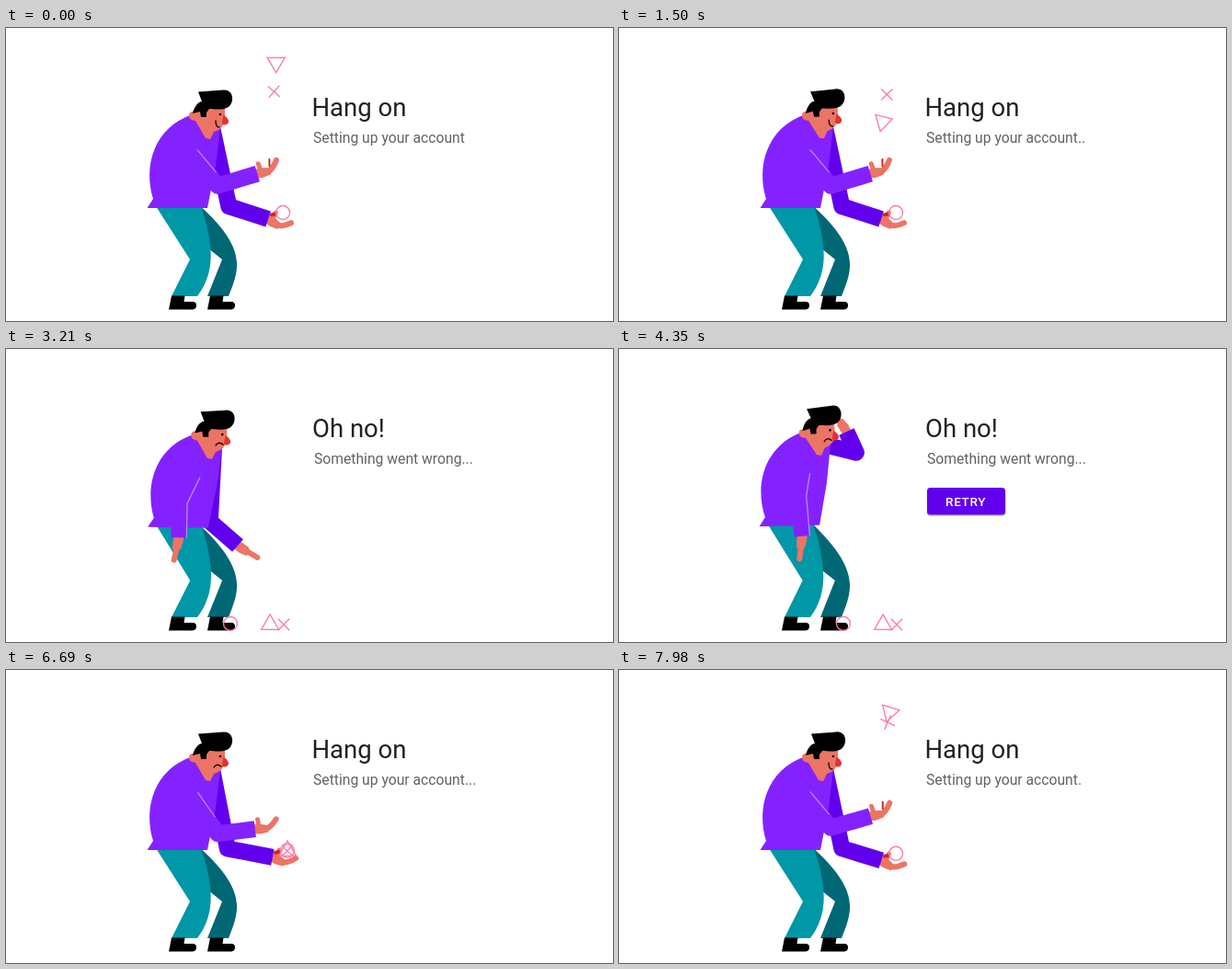
An HTML page for the animation above (8 s loop, 660 px wide and 319 px high).

```html
<!DOCTYPE html>
<html lang="en">
<head>
<meta charset="utf-8">
<title>Setting up</title>
<style>
  html, body { margin: 0; height: 100%; overflow: hidden; background: #fff; }
  svg { display: block; width: 660px; height: 319px; }
  text { font-family: Roboto, sans-serif; }
  .title { font-size: 27.5px; fill: #212121; }
  .sub { font-size: 15.7px; fill: #5f6368; }
  .label { font-size: 13.5px; font-weight: 500; letter-spacing: .7px; fill: #fff; }
  .skin { fill: #ec7465; }
  .line { fill: none; stroke-linecap: round; }
  .hand { stroke: #ec7465; }
  .sleeve { fill: none; stroke-width: 18; stroke-linejoin: round; }
  .toy { fill: none; stroke: #ff7bab; stroke-width: 1.4; }
</style>
</head>
<body>
<svg viewBox="0 0 660 319">
  <path id="backLeg" fill="#006874"/>
  <path id="frontLeg" fill="#0097a7"/>
  <path id="shoe" d="M180 291.500H194.500L193.500 298H203Q207 298 207 302T203 306.500H177Z"/>
  <use href="#shoe" x="42"/>
  <g id="backHand"></g>
  <path id="backArm" class="sleeve" stroke="#6200ee"/>
  <path id="torso" fill="#8422ff" d="M153.500 196 160 186C149 150 161 108 203 94L233 108 228 150 219 196Z"/>
  <g id="head">
    <path class="skin" d="M203 91 218 84 238 86V99Q237 110 226 113L222 121 217 120 206 101Q199 100 199 95.500T203 91Z"/>
    <path d="M236.500 94.500Q242.500 99 242 102T238 105.500 235 102Z" fill="#e5322d"/>
    <circle cx="233" cy="94" r="1.300"/>
    <path id="mouth" class="line" stroke="#111" stroke-width="1.400"/>
    <path d="M209 69.500 236 67.500C248 66 249 82 241 86.500 234 90 226 88 221 88L218 92V97H212L211 91 203 93C205 84 210 80 213 80Z"/>
  </g>
  <g id="frontHand"></g>
  <path id="frontArm" class="sleeve" stroke="#8422ff"/>
  <path id="crease" class="line" stroke="#b98cff" stroke-width="1.300" pathLength="1"/>
  <circle id="circle" class="toy" r="7.500"/>
  <path id="triangle" class="toy" d="M0-10.700 9.500 5.600H-9.500Z"/>
  <path id="cross" class="toy" d="M-8.700 0H8.700M0-8.700V8.700"/>
  <g id="waiting">
    <text class="title" x="332.500" y="96">Hang on</text>
    <text class="sub" x="334" y="125" id="status"></text>
  </g>
  <g id="failed">
    <text class="title" x="333" y="96">Oh no!</text>
    <text class="sub" x="335" y="125">Something went wrong...</text>
  </g>
  <g id="button">
    <rect x="334.500" y="152" width="86" height="30" rx="4" fill="#000" opacity=".2"/>
    <rect x="335" y="151" width="85" height="29.500" rx="3.500" fill="#6200ee"/>
    <text class="label" x="355" y="171">RETRY</text>
  </g>
</svg>
<script>
const $ = id => document.getElementById(id);
const set = (id, name, value) => $(id).setAttribute(name, value);
const clamp = u => Math.min(1, Math.max(0, u));
const ramp = (t, a, b) => clamp((t - a) / (b - a));
const smooth = u => u * u * (3 - 2 * u);
const mod = (a, n) => ((a % n) + n) % n;
const rad = degrees => degrees * Math.PI / 180;
const step = ([x, y], length, angle) =>
  [x + length * Math.cos(rad(angle)), y + length * Math.sin(rad(angle))];

// Blends numbers, arrays and objects of the same structure.
function mix(a, b, u) {
  if (typeof a === 'number') return a + (b - a) * u;
  if (Array.isArray(a)) return a.map((v, i) => mix(v, b[i], u));
  return Object.fromEntries(Object.keys(a).map(k => [k, mix(a[k], b[k], u)]));
}

// Arms are bone lengths and directions: upper, angle, lower, angle.
const juggling = {
  lean: 0, lift: 0, tilt: 0, open: 1, smile: 1,
  back: [88, 78, 45, 18], front: [44, 50, 45, -17]
};
const ready = { ...juggling, smile: 0, back: [88, 79, 50, 11], front: [49, 55, 41, -7] };
const dismayed = {
  lean: 0.04, lift: -2, tilt: 0, open: 0, smile: 0,
  back: [81, 93, 40, 41], front: [33, 116, 39, 91]
};
const puzzled = {
  ...dismayed, lean: -0.06, lift: -3, tilt: -2,
  back: [38, 14, 25, -117], front: [26, 99, 44, 85]
};
const rising = {
  ...dismayed, lean: 1, lift: 0, tilt: 12,
  back: [74, 107, 51, 78], front: [37, 175, 33, 95]
};
const reaching = { ...rising, lean: 1.12, back: [81, 98, 66, 75] };

// Each move: start, end, pose reached, easing.
const moves = [
  [1.62, 2.02, dismayed, smooth],
  [3.3, 3.65, puzzled, smooth],
  [4.95, 5.62, reaching, smooth],
  [5.67, 5.79, rising, u => u * u],
  [5.79, 6.45, ready, u => 1 - (1 - u) ** 3],
  [6.75, 7.25, juggling, smooth]
];
const poseAt = t => moves.reduce(
  (pose, [start, end, next, ease]) => mix(pose, next, ease(ramp(t, start, end))), juggling);

const BEAT = 0.495, CYCLE = 3 * BEAT, RISE = 0.6, FALL = 0.66, SPIN = 242;
const LIFT = CYCLE - RISE - FALL, TOP = [293.5, 33], CAUGHT = [287, 148];

// Position for a time relative to the top of the throw.
function flight(phi, hold) {
  if (phi < -RISE) return mix(CAUGHT, hold, smooth(clamp((phi + RISE + LIFT) / LIFT * 1.6)));
  return phi < 0 ? mix(TOP, hold, (-phi / RISE) ** 2.3) : mix(TOP, CAUGHT, (phi / FALL) ** 2);
}

const toys = {
  circle: {
    phase: -0.625, wait: 1.5, miss: 1.65, launch: 6.69,
    angle: () => 0,
    drop: t => [
      mix(244, 301, (1 - ramp(t, 1.65, 2.25)) ** 3),
      t < 1.95 ? 202 + 1078 * (t - 1.65) ** 2 : Math.min(299, 278 + 1344 * (t - 2.075) ** 2),
      0]
  },
  triangle: {
    phase: -0.13, wait: 1, miss: 1.22, launch: 7.55,
    angle: phi => 180 - SPIN * (phi + 0.13),
    drop: t => [
      301 - 43 * ramp(t, 1.22, 2.08) + 29 * ramp(t, 2.08, 3.13),
      Math.min(300, 16.5 + 255 * (t - 2.08) ** 2),
      Math.max(-120, 5 - 119 * (t - 2.08))]
  },
  cross: {
    phase: 0.37, wait: 1.6, miss: 1.6, launch: 7.06,
    angle: phi => 40 + SPIN * (phi - 0.365),
    drop: t => [
      290 + 12 * ramp(t, 1.6, 2.4),
      Math.min(300, 33 + 293 * (t - 1.12) ** 2),
      Math.min(225, 40 + SPIN * (t - 1.485))]
  }
};

function place(toy, t, hold) {
  const inAir = clock => {
    const phi = mod(clock + toy.phase + RISE + LIFT, CYCLE) - RISE - LIFT;
    return [...flight(phi, hold), toy.angle(phi)];
  };
  if (t < toy.miss) return inAir(Math.min(t, toy.wait));
  const fallen = toy.drop(t);
  const held = mix(fallen, [...hold, fallen[2]], ramp(t, 5.58, 5.67));
  return t < toy.launch ? held : mix(held, inAir(t - 8.05), ramp(t, toy.launch, toy.launch + 0.25));
}

// Draws sleeve and hand, returns the joints.
function drawArm(side, shoulder, [upper, angle, lower, bend], open, twist) {
  const elbow = step(shoulder, upper, angle), wrist = step(elbow, lower, bend);
  set(side + 'Arm', 'd', `M${shoulder}L${elbow}L${wrist}`);
  const tip = mix([25, 1], [24, -8], open), thumb = mix([10, -2], [4, -10], open);
  $(side + 'Hand').innerHTML = `
    <path class="line hand" stroke-width="6" d="M4 1Q14 ${mix(0, 5, open)} ${tip}"/>
    <path class="line hand" stroke-width="5" d="M2 0Q5-2 ${thumb}"/>
    <path class="skin" d="M-1-5H5L15-2 14 5 5 6-1 5Z"/>`;
  set(side + 'Hand', 'transform', `translate(${wrist}) rotate(${bend + twist})`);
  return [shoulder, elbow, wrist];
}

function drawAccent(side, line, colour, width, opacity) {
  $(side + 'Hand').insertAdjacentHTML('beforeend',
    `<path class="line" d="${line}" stroke="${colour}" stroke-width="${width}" opacity="${opacity}"/>`);
}

// The light seam runs along the front edge of the arm.
function drawCrease([shoulder, elbow, wrist], [, angle, , bend], open) {
  const inner = (angle + bend) / 2 - 90, miter = 8 / Math.cos(rad((angle - bend) / 2));
  const seam = [step(shoulder, 8, angle - 90), step(elbow, miter, inner), step(wrist, 8, bend - 90)];
  set('crease', 'd', `M${seam.join('L')}`);
  set('crease', 'stroke-dasharray', `${1 - 0.6 * open} 2`);
}

function drawMan({ lean, lift, tilt, open, smile, back, front }) {
  const hip = [166, 196], turn = 23 * lean;
  const onBody = (x, y) => {
    const [dx, dy] = [x - hip[0], y - hip[1]];
    return step([hip[0] + 15 * lean, hip[1] + lift],
      Math.hypot(dx, dy), Math.atan2(dy, dx) * 180 / Math.PI + turn);
  };
  const body = `translate(${15 * lean} ${lift}) rotate(${turn} ${hip})`;
  set('torso', 'transform', body);
  set('head', 'transform', `${body} rotate(${tilt} 204 96)`);

  set('frontLeg', 'd', `M${onBody(161, 191)}L${200 + 6 * lean} 252 180 292H208
    C${226 + 7 * lean} 268 ${228 + 6 * lean} 240 ${onBody(211, 191)}Z`);
  set('backLeg', 'd', `M${onBody(208, 191)}C263 240 254 262 242 292H219
    L${235 + 2 * lean} 252 ${215 + 10 * lean} 236Z`);

  drawArm('back', onBody(224, 108), back, open, mix(-12, 10, open));
  drawAccent('back', 'M1-6 4-8', '#d32323', 4, open);
  const joints = drawArm('front', onBody(202, 138), front, open, mix(10, 0, open));
  drawAccent('front', 'M15-4 17-11', '#c62828', 2, smile);
  drawCrease(joints, front, open);

  const [left, curve, right] = mix(['226 106', '229 101', '234 105'].map(s => s.split(' ').map(Number)),
                                   [[228, 101], [228, 108], [232, 108]], smile);
  set('mouth', 'd', `M${left}Q${curve} ${right}`);

  const wrist = step(step(onBody(224, 108), back[0], back[1]), back[2], back[3]);
  const grip = mix([8, 11], [16, -7], open);
  return [wrist[0] + grip[0], wrist[1] + grip[1]];
}

function draw(t) {
  const pose = poseAt(t);

  // Small bobbing while juggling, a scratch while puzzled.
  const clock = t < 4 ? t : t - 8.05;
  const busy = 1 - ramp(t, 1.55, 1.8) + ramp(t, 7.1, 7.4);
  const wave = period => 1 - Math.cos(2 * Math.PI * clock / period);
  pose.tilt -= busy * 3 * wave(1.86);
  pose.back[3] -= busy * 2 * wave(BEAT);
  pose.front[3] += busy * 2 * wave(BEAT);
  pose.back[3] += 5 * ramp(t, 3.65, 3.8) * (1 - ramp(t, 4.75, 4.95)) * Math.sin(t * 16);
  const hold = drawMan(pose);

  for (const id in toys) {
    const [x, y, angle] = place(toys[id], t, hold);
    set(id, 'transform', `translate(${x} ${y}) rotate(${angle})`);
  }

  const dots = Math.floor((t < 4 ? t : t - 4.995) / 0.225) % 4;
  $('status').textContent = 'Setting up your account' + '.'.repeat(Math.max(0, dots));
  set('waiting', 'opacity', 1 - ramp(t, 1.68, 1.83) + ramp(t, 5.67, 5.87));
  set('failed', 'opacity', ramp(t, 1.85, 2) - ramp(t, 5.4, 5.6));
  set('button', 'opacity', ramp(t, 3.35, 3.6) - ramp(t, 5.1, 5.3));
}

function frame() {
  draw(performance.now() % 8000 / 1000);
  requestAnimationFrame(frame);
}
frame();
</script>
</body>
</html>
```
